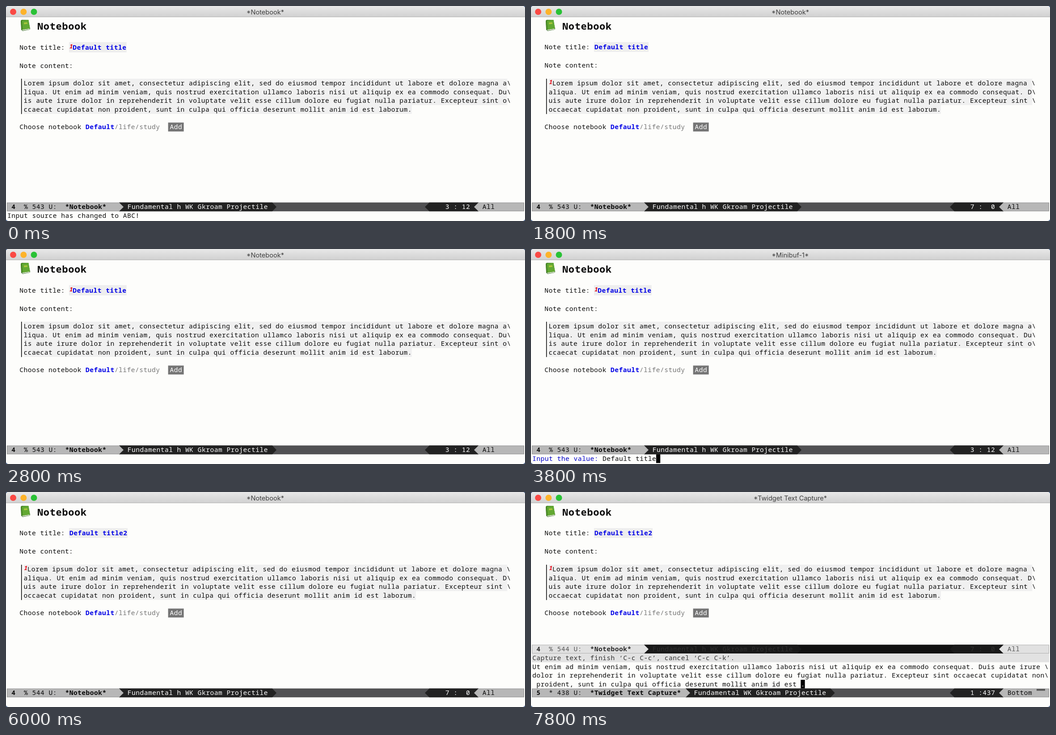
An HTML page with a canvas that plays this animation: 1161 by 482 pixels, repeating every 8 s.

```html
<!DOCTYPE html>
<html lang="en">
<head>
<meta charset="utf-8">
<title>Notebook</title>
<style>
  html, body { margin: 0; width: 100%; height: 100%; overflow: hidden; background: #34507c; }
  canvas { display: block; }
</style>
</head>
<body>
<canvas id="stage" width="1161" height="482"></canvas>
<script>
const ctx = document.getElementById('stage').getContext('2d');
const LOOP = 8000, TICK = 200;
const CELL = 9.24, LEFT = 2.8, BODY = 30, MARK = 8.15, LINE = 19.65;
const EM_PER_CELL = 1.58;
const INK = '#0a0a0a', BLUE = '#0000e6', GRAY = '#757575', RED = '#e00010', FIELD = '#eeeeee';
const LOREM = 'Lorem ipsum dolor sit amet, consectetur adipiscing elit, sed do eiusmod tempor ' +
  'incididunt ut labore et dolore magna aliqua. Ut enim ad minim veniam, quis nostrud exercitation ' +
  'ullamco laboris nisi ut aliquip ex ea commodo consequat. Duis aute irure dolor in reprehenderit ' +
  'in voluptate velit esse cillum dolore eu fugiat nulla pariatur. Excepteur sint occaecat cupidatat ' +
  'non proident, sunt in culpa qui officia deserunt mollit anim id est laborum.';

function rect(x, y, w, h, color) {
  ctx.fillStyle = color;
  ctx.fillRect(x, y, w, h);
}

function poly(color, ...points) {
  ctx.fillStyle = color;
  ctx.beginPath();
  for (const [x, y] of points) ctx.lineTo(x, y);
  ctx.fill();
}

function disc(x, y, r, color) {
  ctx.fillStyle = color;
  ctx.beginPath();
  ctx.arc(x, y, r, 0, 7);
  ctx.fill();
}

// Writes on a fixed cell grid and returns the x position after the last cell.
function write(str, x, baseline, color = INK, style = '', cell = CELL) {
  const size = cell * EM_PER_CELL;
  const inset = (cell - size * 0.6) / 2;
  ctx.font = `${style} ${size}px "Noto Sans Mono", monospace`;
  ctx.fillStyle = color;
  for (const ch of str) {
    if (ch !== ' ') ctx.fillText(ch, x + inset, baseline);
    x += cell;
  }
  return x;
}

function writeMark(n, x, baseline) {
  return write(String(n), x, baseline - 3, RED, 'italic bold', MARK);
}

function wrap(str, width) {
  const lines = [];
  for (let i = 0; i < str.length; i += width) lines.push(str.slice(i, i + width));
  return lines;
}

function drawTitleBar(title) {
  const shade = ctx.createLinearGradient(0, 0, 0, 25);
  shade.addColorStop(0, '#e8e8e8');
  shade.addColorStop(1, '#d0d0d0');
  rect(0, 0, 1161, 25, shade);
  rect(0, 24, 1161, 1, '#b2b2b2');
  disc(16, 13, 7, '#fa4944');
  disc(39.3, 13, 7, '#fdb32a');
  disc(62.5, 13, 7, '#2ac236');
  ctx.font = '14.6px Inter, sans-serif';
  ctx.textAlign = 'center';
  ctx.fillStyle = '#404040';
  ctx.fillText(title, 580, 18.5);
  ctx.textAlign = 'left';
}

function drawBook() {
  poly('#2f6a1c', [33, 33], [35, 31], [50, 31], [54, 51], [53, 53], [37, 56], [34, 53]);
  poly('#e6e9dc', [36, 53], [53, 50.5], [53, 52.5], [37, 55]);
  poly('#62a832', [35.5, 32], [50.5, 31], [53.5, 50.5], [37, 53]);
  poly('#4a8a25', [33, 33], [35.5, 32], [37, 53], [34.5, 52]);
  poly('#a9c63c', [40, 37], [47.5, 36.4], [48, 40], [40.5, 41]);
}

function drawNotebook({ focus, title }) {
  drawBook();
  write('Notebook', 69.6, 53, INK, 'bold', 13.86);

  const titleY = focus === 'title' ? 98 : 97;
  const fieldX = write('Note title: ', BODY, titleY);
  const extra = focus === 'title' ? MARK + 0.6 : 2;
  rect(fieldX, 81, title.length * CELL + extra, titleY - 75, FIELD);
  const nameX = focus === 'title' ? writeMark(1, fieldX, titleY) : fieldX + 1;
  write(title, nameX, titleY, BLUE, 'bold');
  write('Note content:', BODY, titleY + 40.5);

  const marked = focus === 'content';
  const firstY = focus === 'choice' ? 177 : 178;
  const x = BODY + CELL;
  const lines = wrap((marked ? ' ' : '') + LOREM, 117);
  lines.forEach((line, i) => {
    const y = firstY + i * LINE, last = i === lines.length - 1;
    rect(x, y - 15, line.length * CELL + (last ? 0 : 1), LINE + 0.3, '#f0f0f0');
    let start = x;
    if (marked && i === 0) {
      start = writeMark(1, x, y);
      line = line.slice(1);
    }
    write(last ? line : line + '\\', start, y);
  });
  rect(33.9, firstY - 15, 1.6, LINE * 4 + 0.6, INK);

  let end = write('Choose notebook ', BODY, 276);
  ['Default', 'life', 'study'].forEach((name, i) => {
    if (i) end = write('/', end, 276, GRAY);
    if (focus === 'choice') end = writeMark(i + 1, end, 276);
    end = write(name, end, 276, i ? GRAY : BLUE, i ? '' : 'bold');
  });
  end += 2 * CELL;
  rect(end, 261.3, 35, 20, '#757575');
  write('Add', end + 3.6, 276, '#ffffff');
}

function drawModeLine(y, { number, info, buffer, modes, position, place, bend, active }) {
  const height = 19.6, mid = y + height / 2, bottom = y + height, base = y + 14.5;
  const light = active ? '#b7b7b7' : '#e1e1e1';
  const dark = active ? '#222222' : '#191919';
  const ink = active ? INK : '#555555', strong = active ? INK : '#2c2c2c';
  const dimmed = active ? '#ffffff' : '#303030';
  const modesX = bend + 18.5;
  const end = modesX + modes.length * CELL + 10;

  rect(2, y, 1157, height, active ? '#8e8e8e' : '#b0b0b0');
  rect(3, y + 1, 1155, height - 2, light);
  rect(bend, y, 1057 - bend, height, active ? '#515153' : '#111111');
  poly(dark, [bend, y], [end, y], [end + 9.5, mid], [end, bottom], [bend, bottom]);
  poly(dark, [947, y], [1057, y], [1057, bottom], [947, bottom], [937, mid]);
  poly(light, [bend, y], [bend + 10, mid], [bend, bottom]);
  poly(light, [1057, y], [1047, mid], [1057, bottom]);

  write(number, LEFT + CELL, base, strong, 'bold');
  write(info, LEFT + 4 * CELL, base, ink);
  write(buffer, LEFT + 14 * CELL, base, strong, 'bold');
  write(modes, modesX, base, dimmed);
  write(position, 982.5, base, dimmed);
  write(place, 1065.5, base, ink);
}

function drawCapture({ point, text }) {
  rect(2, 362, 1157, 19.6, '#e2e2e2');
  write('Capture text, finish ‘C-c C-c’, cancel ‘C-c C-k’.', LEFT, 377, '#333333');
  const lines = wrap(text, 124).slice(1);
  lines.forEach((line, i) => {
    write(i < lines.length - 1 ? line + '\\' : line, LEFT, 396.5 + i * LINE);
  });
  drawCursor(LEFT + (point % 124) * CELL, 435.8, text[point]);
}

function drawCursor(x, baseline, under = ' ') {
  rect(x, baseline - 14.8, CELL, 19.6, '#000000');
  write(under, x, baseline, '#ffffff');
}

function stateAt(t) {
  const focus = t < 1600 ? 'title' : t < 2000 ? 'content' : t < 2800 ? 'choice'
    : t < 5800 ? 'title' : 'content';
  const deleted = Math.max(0, Math.min(7, Math.floor((t - 6800) / 125)));
  const point = t < 6800 ? LOREM.length : LOREM.length - 1 - deleted;
  return {
    focus,
    title: t < 4800 ? 'Default title' : 'Default title2',
    minibuffer: t >= 3400 && t < 4800,
    typed: t < 4400 ? '' : '2',
    message: t < 1600 ? 'Input source has changed to ABC!' : '',
    capture: t >= 6200,
    point,
    text: deleted ? LOREM.slice(0, point) + '.' : LOREM,
  };
}

function draw(t) {
  const s = stateAt(t);
  rect(0, 0, 1161, 482, '#34507c');
  ctx.save();
  ctx.beginPath();
  ctx.roundRect(0, 0, 1161, 482, 5);
  ctx.clip();
  rect(0, 0, 1161, 482, '#fdfdfb');
  drawTitleBar(s.capture ? '*Twidget Text Capture*' : s.minibuffer ? '*Minibuf-1*' : '*Notebook*');
  drawNotebook(s);

  drawModeLine(s.capture ? 342.4 : 440.6, {
    number: '4',
    info: `% ${530 + s.title.length} U:`,
    buffer: '*Notebook*',
    modes: 'Fundamental h WK Gkroam Projectile',
    position: { title: '3 : 12', content: '7 :  0', choice: '9 : 16' }[s.focus],
    place: 'All',
    bend: 253,
    active: !s.capture,
  });

  if (s.capture) {
    drawCapture(s);
    drawModeLine(440.6, {
      number: '5',
      info: `* ${s.text.length} U:`,
      buffer: '*Twidget Text Capture*',
      modes: 'Fundamental WK Gkroam Projectile',
      position: `1 :${s.point}`,
      place: 'Bottom',
      bend: 346,
      active: true,
    });
    rect(1131, 441.5, 19, 4, '#585858');
  }

  if (s.minibuffer) {
    const x = write('Input the value: ', LEFT, 475, '#0000c8');
    drawCursor(write(s.title + s.typed, x, 475), 475);
  } else {
    write(s.message, LEFT, 475);
  }
  ctx.restore();
}

const started = performance.now();
function frame() {
  const t = (performance.now() - started) % LOOP;
  draw(Math.floor(t / TICK) * TICK);
  requestAnimationFrame(frame);
}
frame();
</script>
</body>
</html>
```
